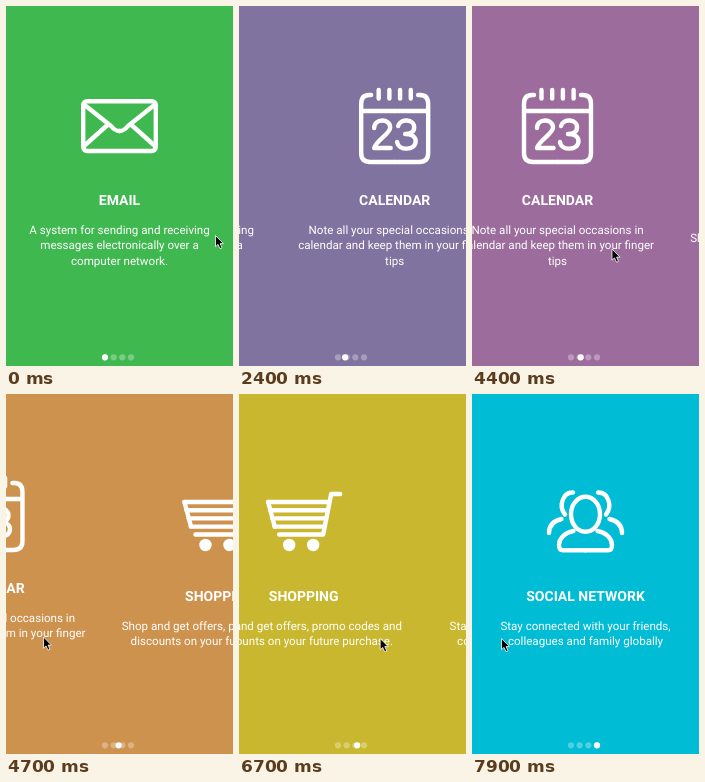
An HTML page that plays this animation: 227x360 px, repeating every 8000 ms.

```html
<!DOCTYPE html>
<html lang="en">
<head>
<meta charset="utf-8">
<title>Onboarding pager</title>
<style>
html, body { margin: 0; width: 100%; height: 100%; overflow: hidden; }
svg { display: block; width: 227px; height: 360px; }
text { font-family: Roboto, Arial, sans-serif; font-size: 11.6px; fill: #fff; text-anchor: middle; text-rendering: geometricPrecision; }
.title { font-size: 14px; font-weight: 700; }
.icon { fill: none; stroke: #fff; stroke-width: 4.4; stroke-linecap: round; stroke-linejoin: round; }
.solid { fill: #fff; stroke: none; }
</style>
</head>
<body>
<svg viewBox="0 0 227 360">
  <rect id="bg" width="227" height="360"/>
  <g id="pages"></g>
  <g id="dots" fill="#fff"></g>
  <path id="cursor" d="M0 0V11.2L2.5 8.9 4.5 13.2 6.5 12.3 4.6 8.1H8Z" stroke="#fff" stroke-width=".8"/>
</svg>
<script>
const LOOP = 8000, STEP = 100, PITCH = 231, MID = 113.5;
const $ = id => document.getElementById(id);
const repeat = (n, make) => Array.from({ length: n }, (_, i) => make(i)).join('');

// A path and its reflection about the page's middle
const mirror = d => `<path d="${d}"/><path d="${d}" transform="translate(${2 * MID}) scale(-1 1)"/>`;
const wheel = x => `<circle class="solid" cx="${x}" cy="151" r="6.2"/>`;

const email = '<rect x="77.2" y="95.2" width="72.6" height="49.8" rx="4"/>'
  + mirror('M78 98.5L105 120Q109 125 113.5 125M78 140L102 118.5');

const calendar = mirror('M90 89H88Q80 89 80 98V147Q80 156 89 156H113.5M81 105H113.5')
  + repeat(4, i => `<path d="M${97.5 + i * 10.7} 84V92.5"/>`)
  + '<path d="M93 122C93 112 109 112 109 121.5C109 128 95 134 93 142H109.5"/>'
  + '<path d="M117 120C119 112 133.5 113 133 121.5C133 126 129 128 124 128C131 128 134.5 131 134.5 135C134.5 145 117 145 116 136"/>';

const cart = '<path d="M150 100H141L133 140.5H89M78 108L84.5 132.5"/>'
  + repeat(4, i => `<path d="M${78 + i * 2.1} ${108 + i * 8.2}H${139 - i * 1.6}"/>`)
  + wheel(99) + wheel(123);

const people = '<ellipse cx="113.5" cy="120.3" rx="14.5" ry="17.5"/>'
  + mirror('M101.500 137C92 139 87 145 87 151Q87 156.300 91 156.300H113.500'.replace(/00\b/g, '')
  + 'M101 98.5C91 98 86 112 93 120.5M89.500 125C81 127 77 132 77 139'.replace(/00\b/g, ''));

const pages = [
  { color: [63, 184, 80], y: 199, title: 'EMAIL', icon: email,
    lines: ['A system for sending and receiving', 'messages electronically over a', 'computer network.'] },
  { color: [142, 99, 177], y: 199, title: 'CALENDAR', icon: calendar,
    lines: ['Note all your special occasions in', 'calendar and keep them in your finger', 'tips'] },
  { color: [255, 183, 3], y: 207, title: 'SHOPPING', icon: cart,
    lines: ['Shop and get offers, promo codes and', 'discounts on your future purchase.'] },
  { color: [0, 188, 212], y: 207, title: 'SOCIAL NETWORK', icon: people,
    lines: ['Stay connected with your friends,', 'colleagues and family globally'] }
];

// The pointer rests or drags the page; between acts it glides.
const rest = (from, to, x, y) => ({ from, to, x, y, end: x });
const swipe = (from, to, x, end, y) => ({ from, to, x, end, y, drag: true });
const acts = [
  rest(0, 0, 209.5, 229.5),
  swipe(1600, 2700, 178, -12, 243),
  rest(3500, 3900, 208.5, 241.5),
  swipe(4200, 5120, 168, 18, 243),
  rest(5300, 5600, 96.5, 244.5),
  rest(5800, 6100, 218, 245),
  swipe(6300, 7650, 190, 29.5, 244.5)
];

const mix = (a, b, k) => a + (b - a) * k;
function ease(t, from, to) {
  const u = Math.min(1, Math.max(0, (t - from) / (to - from)));
  return u * u * (3 - 2 * u);
}

const pagePos = t => acts.filter(a => a.drag).reduce((sum, a) => sum + ease(t, a.from, a.to), 0);

function pointer(t) {
  const n = acts.filter(a => a.from <= t).length;
  const a = acts[n - 1], b = acts[n];
  if (a.drag && t < a.to) return [Math.max(a.end, a.x - PITCH * ease(t, a.from, a.to)), a.y];
  if (!b) return [a.end, a.y];
  const k = ease(t, a.to, b.from);
  return [mix(a.end, b.x, k), mix(a.y, b.y, k)];
}

const dotX = i => 99 + i * 8.67;
const dot = (i, extra) => `<circle cx="${dotX(i)}" cy="351.3" r="3.1" ${extra}/>`;

$('pages').innerHTML = pages.map((p, i) => `<g transform="translate(${i * PITCH})">
  <g class="icon">${p.icon}</g>
  <text class="title" x="${MID}" y="${p.y}">${p.title}</text>
  ${p.lines.map((s, n) => `<text x="${MID}" y="${p.y + 29 + n * 15.3}">${s}</text>`).join('')}
</g>`).join('');
$('dots').innerHTML = repeat(pages.length, i => dot(i, 'opacity=".3"')) + dot(0, 'id="active"');

function draw(now) {
  const t = Math.floor(now % LOOP / STEP) * STEP;
  const pos = pagePos(t);
  const i = Math.min(Math.floor(pos), pages.length - 2);
  const rgb = pages[i].color.map((c, n) => Math.round(mix(c, pages[i + 1].color[n], pos - i)));
  $('bg').setAttribute('fill', `rgb(${rgb})`);
  $('pages').setAttribute('transform', `translate(${-pos * PITCH})`);
  $('active').setAttribute('cx', dotX(pos));
  $('cursor').setAttribute('transform', `translate(${pointer(t)})`);
}

const start = performance.now();
function tick() {
  draw(performance.now() - start);
  requestAnimationFrame(tick);
}
tick();
</script>
</body>
</html>
```
